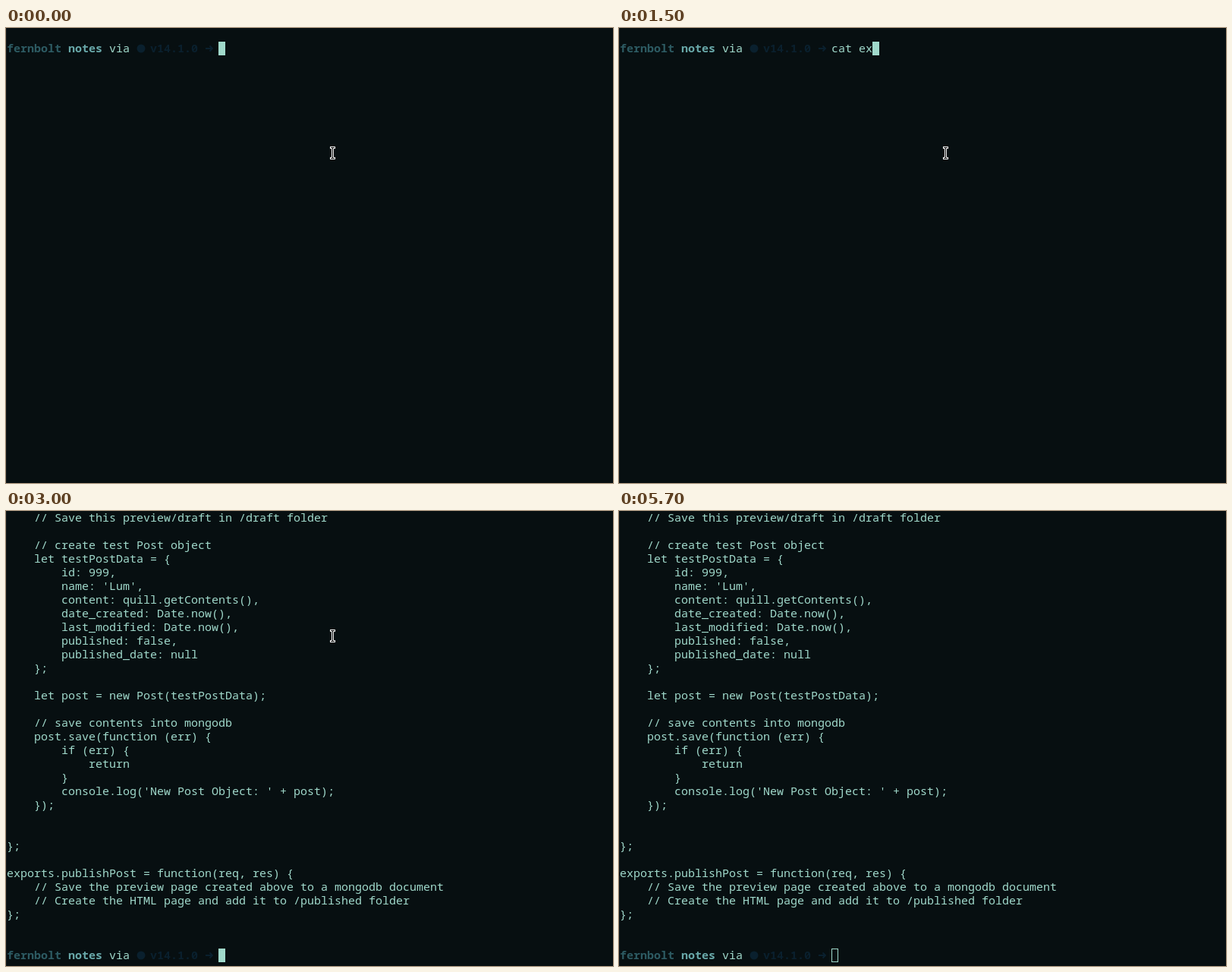
These frames come from a looping animation (800x599 px, 5800 ms). An HTML page:

```html
<!DOCTYPE html>
<html lang="en">
<head>
<meta charset="utf-8">
<title>Terminal</title>
<style>
  :root { --bg: #070f11; --fg: #a0d9cb; --loop: 5.8s step-end infinite; }
  html, body { margin: 0; width: 100%; height: 100%; overflow: hidden; background: var(--bg); }
  #stage { position: relative; width: 800px; height: 599px; overflow: hidden; background: var(--bg); }
  #stage > *, #prompt > * { position: absolute; }
  pre { margin: 0; left: 1px; top: -1px; font: 15px/18px "Noto Sans Mono", monospace; color: var(--fg); }
  b { font-weight: 700; }
  .user { color: #2d5b63; }
  .dir { color: #69a9aa; }
  .version { color: #0a202e; }
  svg { left: 0; top: 0; }

  #edge { left: 0; top: 0; width: 1px; height: 599px; background: #14191b; }
  #code { animation: output var(--loop); }
  #prompt { left: 0; top: 0; width: 800px; height: 18px; animation: row var(--loop); }
  #caret { left: 280px; top: 0; width: 520px; height: 18px; background: var(--bg); animation: type var(--loop); }
  #block { width: 9px; height: 18px; box-sizing: border-box; border: 1px solid var(--fg); animation: blur var(--loop); }
  #mouse { animation: move var(--loop); }

  @keyframes output {
    0% { visibility: hidden; }
    51.72%, 100% { visibility: visible; }
  }
  @keyframes row {
    0% { transform: translateY(18px); }
    51.72%, 100% { transform: translateY(576px); }
  }
  /* The caret also masks the part of the command not typed yet. */
  @keyframes type {
    0% { transform: none; }
    10.34% { transform: translateX(9px); }
    13.79% { transform: translateX(18px); }
    17.24% { transform: translateX(27px); }
    18.96% { transform: translateX(36px); }
    22.41% { transform: translateX(45px); }
    25.86% { transform: translateX(54px); }
    29.31% { transform: translateX(135px); }
    48.27% { transform: translateX(126px); }
    51.72%, 100% { transform: none; }
  }
  @keyframes blur {
    0% { background: var(--fg); }
    98.27%, 100% { background: transparent; }
  }
  @keyframes move {
    0% { transform: translate(427px, 156px); }
    91.37% { transform: translate(125px, 46px); }
    93.1% { transform: translate(101px, 25px); }
    94.82% { transform: translate(89px, 14px); }
    96.55% { transform: translate(83px, 9px); }
    98.27%, 100% { transform: translate(83px, -40px); }
  }
</style>
</head>
<body>
<div id="stage">
  <div id="edge"></div>
  <pre id="code">    // Save this preview/draft in /draft folder

    // create test Post object
    let testPostData = {
        id: 999,
        name: 'Lum',
        content: quill.getContents(),
        date_created: Date.now(),
        last_modified: Date.now(),
        published: false,
        published_date: null
    };

    let post = new Post(testPostData);

    // save contents into mongodb
    post.save(function (err) {
        if (err) {
            return
        }
        console.log('New Post Object: ' + post);
    });


};

exports.publishPost = function(req, res) {
    // Save the preview page created above to a mongodb document
    // Create the HTML page and add it to /published folder
};</pre>
  <div id="prompt">
    <pre><b class="user">fernbolt</b> <b class="dir">notes</b> via   <b class="version">v14.1.0</b>   cat example.js</pre>
    <svg class="version" width="280" height="18">
      <circle cx="178" cy="9" r="5.5" fill="currentColor"/>
      <path d="M263 9H272M268.5 5.5L272 9L268.5 12.5" fill="none" stroke="currentColor" stroke-width="2"/>
    </svg>
    <div id="caret"><div id="block"></div></div>
  </div>
  <svg id="mouse" width="7" height="17" fill="none" stroke-linecap="square">
    <path d="M1.5 1.5H5.5M3.5 1.5V15.5M1.5 15.5H5.5" stroke="#fff" stroke-width="3"/>
    <path d="M1.5 1.5H5.5M3.5 1.5V15.5M1.5 15.5H5.5" stroke="#000"/>
  </svg>
</div>
</body>
</html>
```
